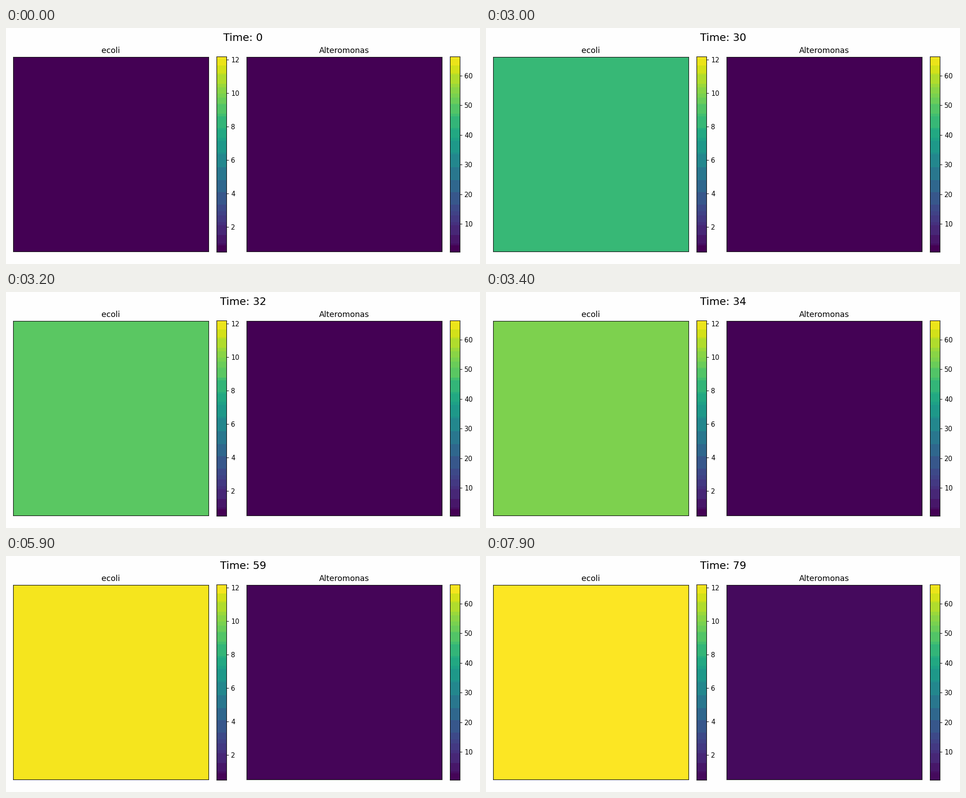
Animation of 1058x529 px, one loop 8 s. Source, as a matplotlib script:

```python
import numpy as np
import matplotlib.pyplot as plt
from matplotlib.animation import FuncAnimation

W, H, DPI = 1058, 529, 105.8
FRAMES, INTERVAL = 80, 100
PANEL = 436            # side of each square panel in pixels
PANEL_WEIGHT = 2500    # panel area relative to one colour step of the bars

plt.rcParams["font.family"] = "DejaVu Sans"
VIRIDIS = plt.get_cmap("viridis")(np.arange(256), bytes=True)[:, :3].astype(int)

# Growth of the first population, as colour level over time
TIMES = np.array([0, 7, 15, 22, 30, 32, 34, 37, 40, 45, 59, 79], float)
LEVELS = np.array([0, 12, 42, 94, 172, 191, 206, 222, 232, 242, 252, 255.5])
SLOPES = np.gradient(LEVELS, TIMES)


def left_level(t):
    """Smooth cubic through the growth points."""
    i = min(np.searchsorted(TIMES, t, side="right") - 1, len(TIMES) - 2)
    h = TIMES[i + 1] - TIMES[i]
    s = (t - TIMES[i]) / h
    y = ((1 + 2 * s) * (1 - s) ** 2 * LEVELS[i] + s * (1 - s) ** 2 * h * SLOPES[i]
         + s * s * (3 - 2 * s) * LEVELS[i + 1] - s * s * (1 - s) * h * SLOPES[i + 1])
    return int(np.clip(y, 0, 255))


def right_level(t):
    return int(0.42 * (np.exp(0.037 * t) - 1))


# Similar colours share one reduced colour
BUCKETS = np.unique(VIRIDIS // [32, 16, 32], axis=0, return_inverse=True)[1].ravel()


def reduced_colours(panel_levels):
    """Mean colour of each bucket, weighted by the area shown."""
    weight = np.ones(256)
    for level in panel_levels:
        weight[level] += PANEL_WEIGHT
    total = np.bincount(BUCKETS, weight)
    means = [np.bincount(BUCKETS, weight * VIRIDIS[:, c]) / total for c in range(3)]
    return np.floor(np.stack(means, axis=1) + 1e-6)[BUCKETS] / 255


fig = plt.figure(figsize=(10, 5), dpi=DPI, facecolor="#fefefe")


def add_axes(x, top, width, bottom):
    ax = fig.add_axes([x / W, 1 - bottom / H, width / W, (bottom - top) / H])
    for spine in ax.spines.values():
        spine.set_linewidth(0.8)
    return ax


def add_panel(x, title):
    ax = add_axes(x, 65, PANEL, 65 + PANEL)
    ax.set(xticks=[], yticks=[])
    ax.set_title(title, fontsize=12, pad=6)
    return ax


def add_bar(x, low, high, ticks):
    ax = add_axes(x, 64, 22, 502)
    image = ax.imshow(np.zeros((256, 1, 3)), extent=(0, 1, low, high),
                      origin="lower", aspect="auto", interpolation="nearest")
    ax.set_xticks([])
    ax.yaxis.tick_right()
    ax.set_yticks(ticks)
    ax.tick_params(labelsize=10)
    return image


panels = [add_panel(16, "ecoli"), add_panel(537, "Alteromonas")]
bars = [add_bar(470, 0.5, 12.2, range(2, 13, 2)),
        add_bar(991, 0.5, 66.5, range(10, 61, 10))]
heading = fig.suptitle("Time: 0", fontsize=16, y=0.98)


def update(t):
    levels = left_level(t), right_level(t)
    colours = reduced_colours(levels)
    for panel, level in zip(panels, levels):
        panel.set_facecolor(colours[level])
    for bar in bars:
        bar.set_data(colours[:, None, :])
    heading.set_text(f"Time: {t}")
    return [heading, *bars]


anim = FuncAnimation(fig, update, frames=FRAMES, interval=INTERVAL,
                     init_func=lambda: update(0), repeat=True, repeat_delay=0)
plt.show()
```
